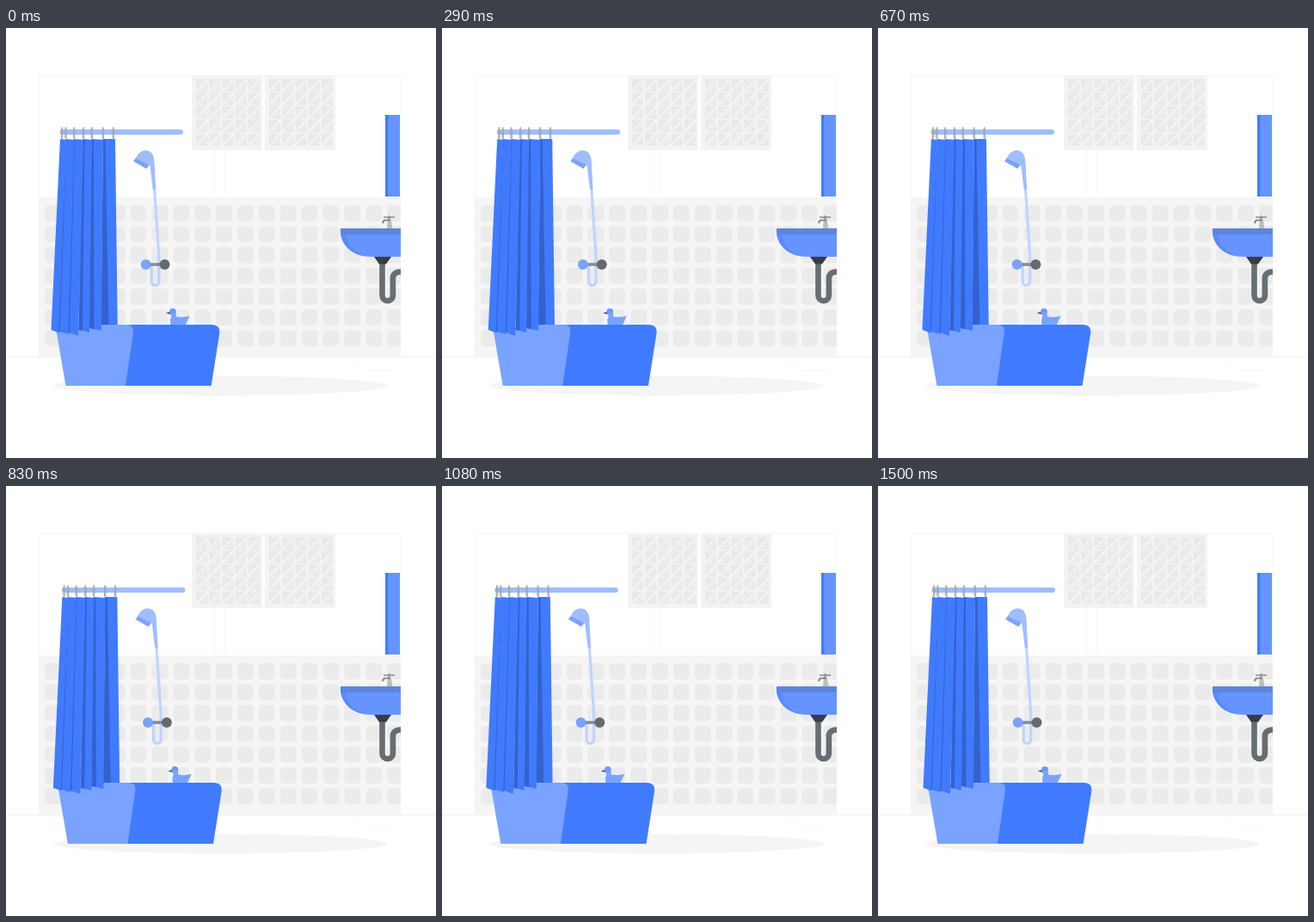
Animation of 500 by 500 pixels, one loop 1.54 s. Source, as an HTML page:

```html
<!DOCTYPE html>
<html lang="en">
<head>
<meta charset="utf-8">
<title>Shaking bathtub</title>
<style>
  html, body { margin: 0; width: 100%; height: 100%; overflow: hidden; background: #fff; }
  svg { display: block; width: 100%; height: 100%; }
</style>
</head>
<body>
<svg viewBox="0 0 500 500">
  <defs>
    <clipPath id="room"><path d="M38 55H459V383H38Z"/></clipPath>
    <g id="window">
      <path fill="#f3f3f3" d="M0 0H82V87H0Z"/>
      <g id="panes"></g>
    </g>
  </defs>

  <path d="M0 382.5H500" stroke="#f0f0f0"/>
  <path d="M401 390H416M417 398.5H449" stroke="#f7f7f7"/>
  <g clip-path="url(#room)">
    <path d="M38.5 55.5H458.5V382H38.5Z" fill="#fff" stroke="#f5f5f5"/>
    <path d="M242.5 142V197M254.5 142V197" stroke="#f7f7f7"/>
    <path d="M38 197H459V382.5H38Z" fill="#f5f5f5"/>
    <g id="tiles" fill="#ebebeb"></g>
    <use href="#window" x="216" y="55"/>
    <use href="#window" x="301" y="55"/>

    <path d="M441 101H458V196H441Z" fill="#6694ff"/>
    <path d="M441 101H444.3V196H441Z" fill="#407bff"/>

    <path d="M437.5 273V311a6.2 6.2 0 0 0 12.4 0V291q0-7.5 10-7.5" fill="none" stroke="#666e73" stroke-width="6.6"/>
    <path d="M428 266H448L442 274.5H434Z" fill="#363d44"/>
    <path d="M443 233L444 222H447.5L449.5 233Z" fill="#bdbdbd"/>
    <path d="M439 220H452M445.5 218V223" stroke="#888d8f" stroke-width="1.7"/>
    <path d="M447 223.5H441Q438.5 223.5 438 227" fill="none" stroke="#888d8f" stroke-width="2.2"/>
    <path d="M389 233H460V266H425C403 266 389 252 389 236Z" fill="#6694ff"/>
    <path d="M389 238H395C396 252 405 262 419 265.7C402 264 390 252 389 238Z" fill="#598aff"/>
    <path d="M390 233H460V240H389.5Q388 233 390 233Z" fill="#5d85dc"/>
  </g>
  <ellipse cx="249.5" cy="416" rx="194" ry="11.3" fill="#f5f5f5"/>

  <g id="bath">
    <!-- shower -->
    <path d="M172.5 186L177.8 265V295a4.3 4.3 0 0 1-8.6 0V276" fill="none" stroke="#bfd3ff" stroke-width="3.2"/>
    <path d="M148.5 155L154 146Q161 139.500 168 144Q172 147.500 172.500 155L174.300 188H170.800L167.300 159L163 163.500Z" fill="#9fbdff"/>
    <path d="M148.3 155L150.8 151.500L166 159L163.500 163.500Z" fill="#79a3ff"/>
    <path d="M166 275H181" stroke="#858b8e" stroke-width="3.600"/>
    <circle cx="162.700" cy="275" r="6" fill="#79a3ff"/>
    <circle cx="184.500" cy="275" r="6" fill="#636b70"/>

    <!-- duck -->
    <path d="M186 331.500Q190 329 194 330.500L193 333.500Z" fill="#455066"/>
    <circle cx="194" cy="330" r="3.900" fill="#6c99ff"/>
    <path d="M192 331H197.500L198 335.500Q205 337 213.500 335L208 346.500H191.500L191 339Q193 336 192 331Z" fill="#79a3ff"/>

    <!-- curtain and tub -->
    <rect x="62.500" y="118" width="143.500" height="6" rx="3" fill="#9fbdff"/>
    <path d="M113 129H127L129.800 347H111Z" fill="#407bff"/>
    <path d="M113 129H115.500L119.500 347H110.500Z" fill="#3362cc"/>
    <path d="M138 345H240Q249 345.500 248.400 354L238.700 416H138Z" fill="#407bff"/>
    <path d="M58 349L111 345H141Q149 345.500 148 354L139 416H69.500Z" fill="#79a3ff"/>
    <g id="folds"></g>
    <g id="rings" fill="none" stroke="#a3a5a3" stroke-width="1.200"></g>
  </g>
</svg>
<script>
const $ = id => document.getElementById(id);
const repeat = (n, draw) => Array.from({ length: n }, (_, i) => draw(i)).join('');

$('tiles').innerHTML = repeat(7, row => repeat(17, col =>
  `<rect x="${45 + col * 24.88}" y="${206 + row * 24.2}" width="19" height="19" rx="5"/>`));

$('panes').innerHTML = repeat(5, row => repeat(5, col =>
  `<g transform="translate(${5 + col * 15.2} ${4.5 + row * 15.8})">
    <path d="M0 0H13V14.300H0Z" fill="#e9e9e9"/>
    <path d="M0 14L13 0.500" stroke="#f6f6f6" stroke-width="1.800"/>
    <path d="M4.500 14L13 5" stroke="#f3f3f3"/>
  </g>`));

// Each fold: top left, top right, bottom left, left depth, bottom right, right depth, shade width
const folds = [
  [63, 70, 52.5, 351, 62, 354.5, 0],
  [70, 80, 61.5, 353, 73, 356, 1.2],
  [79.5, 91, 72.5, 354, 84, 358, 1.5],
  [90, 101, 84.5, 351, 97, 354, 4.5],
  [100, 113, 97, 349, 111, 352, 5.5]
];
$('folds').innerHTML = folds.map(([a, b, c, cy, d, dy, shade]) =>
  `<path d="M${a} 129L${b} 130L${d} ${dy}L${c} ${cy}Z" fill="#407bff"/>
   <path d="M${a} 129.500H${a + shade * 0.35}L${c + shade} ${cy + shade * 0.2}L${c} ${cy}Z" fill="#3362cc"/>`
).join('');

$('rings').innerHTML = [65.2, 69.5, 79.3, 90, 99.8, 112.8, 124.8]
  .map(x => `<ellipse cx="${x}" cy="122.500" rx="0.800" ry="7"/>`).join('');

const LOOP = 1540, STEP = LOOP / 37, SHAKE = 1500, LEAD = 33;
const stops = [0, -1, 2, -4, 4, -4, 4, -4, 2, -1, 0];

function shake(ms) {
  const p = (ms + LEAD) % SHAKE / SHAKE * 10;
  const i = Math.floor(p);
  return stops[i] + (stops[i + 1] - stops[i]) * (p - i);
}

const start = performance.now();
function draw() {
  const t = (performance.now() - start) % LOOP;
  const time = Math.floor((t + 5) / STEP) * STEP;
  $('bath').setAttribute('transform', `translate(${shake(time) + 0.2} 0)`);
  requestAnimationFrame(draw);
}
draw();
</script>
</body>
</html>
```
